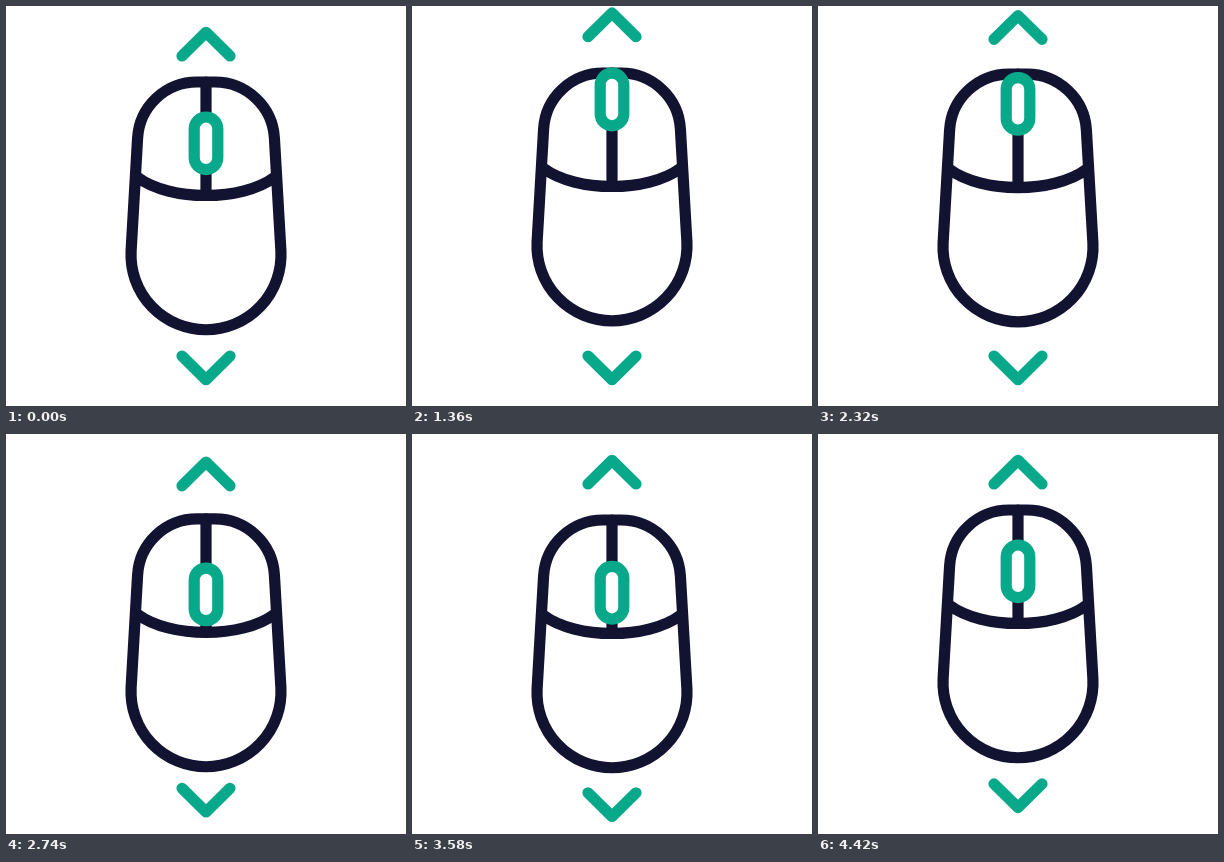
These frames come from a looping animation (400 px wide and 400 px high, 4450 ms). An HTML page:

```html
<!DOCTYPE html>
<html lang="en">
<head>
<meta charset="utf-8">
<title>Mouse scroll</title>
<style>
  html, body { margin: 0; height: 100%; overflow: hidden; background: #fff; }
  svg { display: block; width: 100%; height: 100%; }
  path, rect { fill: none; stroke-width: 11.2; stroke-linecap: round; stroke-linejoin: round; }
  .dark { stroke: #121331; }
  .green { stroke: #08a88a; }
  rect { fill: #fff; }
</style>
</head>
<body>
<svg viewBox="0 0 400 400">
  <path id="up" class="green" d="M176 50 200 26.3 224 50"/>
  <path id="down" class="green" d="M176 350 200 373.7 224 350"/>
  <g id="mouse">
    <path class="dark" d="M191 76H209A59.5 59.5 0 0 1 268.4 132L274.9 244.9A75 75 0 1 1 125.1 244.9L131.6 132A59.5 59.5 0 0 1 191 76Z"/>
    <path class="dark" d="M131 171C148 183.6 174 189.5 200 189.5S252 183.6 269 171M200 76V189"/>
    <rect id="wheel" class="green" x="188.2" y="111" width="23.6" height="52.6" rx="11.8"/>
  </g>
</svg>
<script>
const LOOP = 4450, STEP = 30, FIRST = 10;
const BEAT = 390;                     // one stroke of a scroll
const UP = 1015, DOWN = 2620;         // start of each pair of scrolls
const UP_END = UP + 3 * BEAT, DOWN_END = DOWN + 3 * BEAT;

// Eased 0 to 1
function ramp(t, start, duration) {
  const x = Math.min(1, Math.max(0, (t - start) / duration));
  return (1 - Math.cos(Math.PI * x)) / 2;
}

// Out, back, out again, then held at 1
const scroll = (t, start) => ramp(t, start, BEAT) - ramp(t, start + BEAT, BEAT) + ramp(t, start + 2 * BEAT, BEAT);

// A double scroll that returns with a small overshoot
function nudge(t, start) {
  const end = start + 3 * BEAT;
  return scroll(t, start) - 1.1 * ramp(t, end, 530) + 0.1 * ramp(t, end + 530, 120);
}

// Vertical offsets in pixels; the wheel moves relative to the mouse
const motion = {
  up: t => -20 * nudge(t, UP),
  down: t => 20 * nudge(t, DOWN),
  mouse: t => -10 * ramp(t, UP, 435) + 20 * ramp(t, UP_END, 650) - 10 * ramp(t, DOWN_END, 635),
  wheel: t => t < DOWN + BEAT
    ? -36 * scroll(t, UP) + 62 * ramp(t, UP_END, 780)
    : 26 * scroll(t, DOWN) - 26 * ramp(t, DOWN_END, 520),
};

function draw() {
  const now = performance.now() % LOOP;
  const t = Math.floor((now - FIRST) / STEP) * STEP + FIRST;
  for (const id in motion) {
    document.getElementById(id).setAttribute("transform", `translate(0 ${motion[id](t)})`);
  }
  requestAnimationFrame(draw);
}
draw();
</script>
</body>
</html>
```
